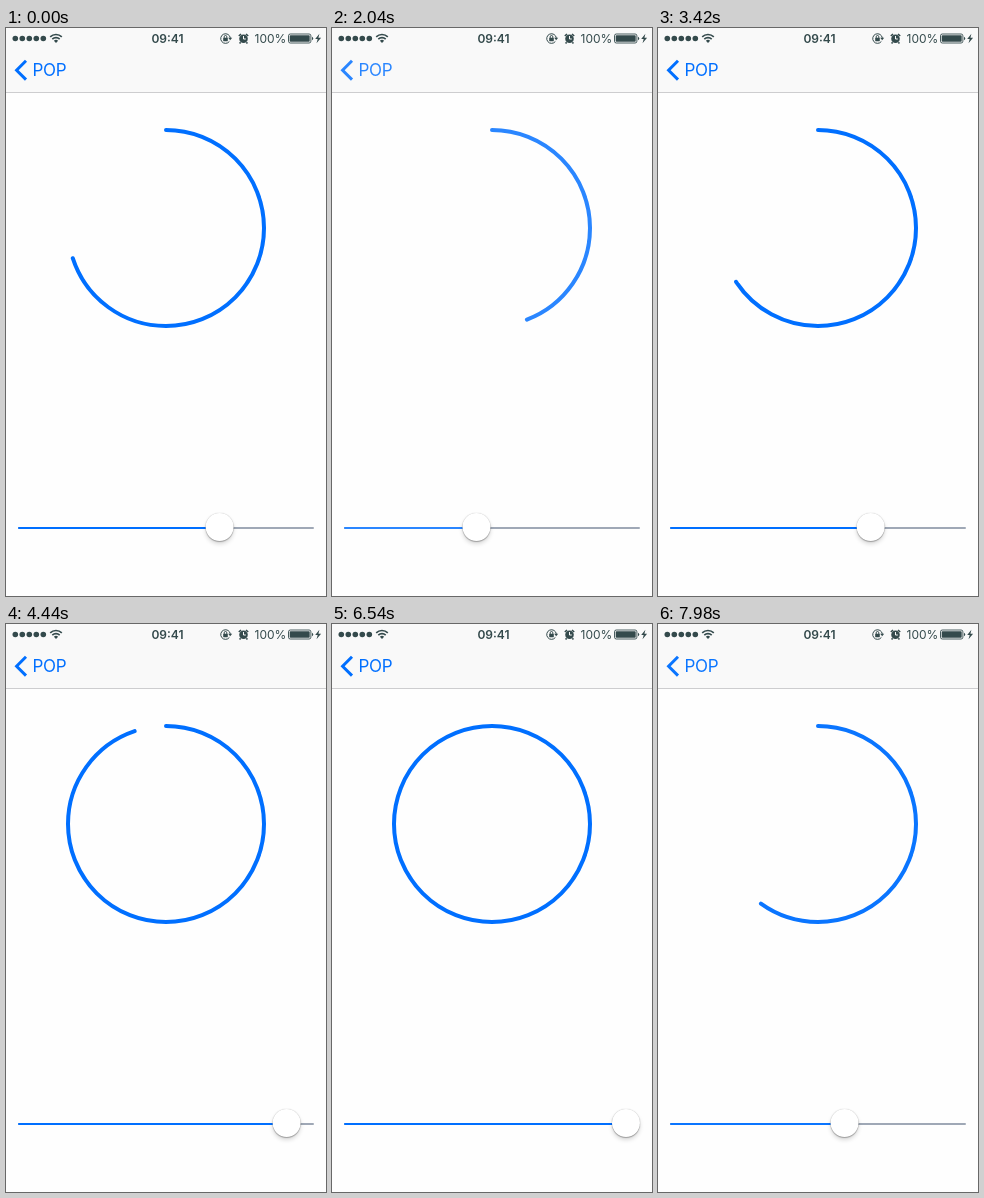
An HTML page that plays this animation: 320x568 px, repeating every 8000 ms.

```html
<!DOCTYPE html>
<html lang="en">
<head>
<meta charset="utf-8">
<title>Progress ring</title>
<style>
@property --v { syntax: "<number>"; inherits: true; initial-value: .7; }
@property --a { syntax: "<number>"; inherits: true; initial-value: .7; }

html, body { margin: 0; width: 100%; height: 100%; overflow: hidden; background: #fff; }

.stage {
  --t: clamp(0, (.65 - var(--a)) / .21, 1);
  --x: calc(26px + 268px * var(--v));
  position: relative;
  width: 320px;
  height: 568px;
  overflow: hidden;
  background: #fefefe;
  color: rgb(calc(42 * var(--t)) calc(111 + 23 * var(--t)) 255);
  animation: drag 8s infinite ease-in-out, follow 8s infinite ease-in-out;
}

svg { position: absolute; inset: 0; font-family: Inter, Roboto, sans-serif; }
.status { fill: #344a4c; font-size: 12px; }
.line { fill: none; stroke: #344a4c; }
.ring {
  fill: none;
  stroke: currentColor;
  stroke-width: 4;
  stroke-linecap: round;
  stroke-dasharray: 100px 100px;
  stroke-dashoffset: calc((1 - var(--a)) * 100px);
}

.track, .fill { position: absolute; left: 12px; top: 499px; height: 2px; border-radius: 1px; }
.track { width: 296px; background: #9fa8b6; }
.fill { width: calc(var(--x) - 12px); background: currentColor; }
.thumb {
  position: absolute;
  left: -14px;
  top: 485px;
  width: 28px;
  height: 28px;
  border-radius: 50%;
  background: #fff;
  box-shadow: 0 0 1px rgba(0, 0, 0, .28), 0 1px 1px rgba(0, 0, 0, .26), 0 3px 4px rgba(0, 0, 0, .15);
  transform: translateX(var(--x));
}

/* finger on the slider */
@keyframes drag {
  0% { --v: .7; }
  5.6% { --v: .75; animation-timing-function: ease-in; }
  12.75% { --v: .651; animation-timing-function: ease-out; }
  23%, 26.5% { --v: .442; }
  34% { --v: .65; }
  40.875% { --v: .65; animation-timing-function: ease-in; }
  42.75% { --v: .696; animation-timing-function: ease-out; }
  53%, 56% { --v: .95; }
  73%, 81.75% { --v: 1; }
  91.25%, 100% { --v: .599; }
}

/* ring trails behind the slider */
@keyframes follow {
  0%, .8% { --a: .7; }
  7.2% { --a: .75; animation-timing-function: ease-in; }
  12.75% { --a: .694; animation-timing-function: ease-out; }
  24.6%, 28% { --a: .442; }
  36% { --a: .65; }
  41.2% { --a: .65; animation-timing-function: ease-in; }
  42.75% { --a: .657; animation-timing-function: ease-out; }
  54.6%, 57% { --a: .948; }
  75.5%, 82.2% { --a: 1; }
  93.5%, 100% { --a: .599; }
}
</style>
</head>
<body>
<div class="stage">
  <svg width="320" height="568" viewBox="0 0 320 568">
    <rect width="320" height="64" fill="#f9f9f9"/>
    <rect y="64" width="320" height="1" fill="#cdcdcf"/>

    <g class="status">
      <circle cx="9.3" cy="10.5" r="2.8"/>
      <circle cx="16.3" cy="10.5" r="2.8"/>
      <circle cx="23.3" cy="10.5" r="2.8"/>
      <circle cx="30.3" cy="10.5" r="2.8"/>
      <circle cx="37.3" cy="10.5" r="2.8"/>
      <path d="M50 15 47.9 12.7A3 3 0 0 1 52.1 12.7Z"/>
      <g class="line" stroke-width="1.6">
        <path d="M44.2 8.9A8.3 8.3 0 0 1 55.8 8.9"/>
        <path d="M46.3 11.1A5.3 5.3 0 0 1 53.7 11.1"/>
      </g>
      <text x="161.5" y="14.7" font-weight="600" text-anchor="middle">09:41</text>

      <path class="line" d="M223.4 13.4A4.8 4.8 0 1 1 224.3 10"/>
      <path d="M222.2 9.7h4l-2 2.6z"/>
      <rect x="217.2" y="9.8" width="4.6" height="3.4" rx=".4"/>
      <path class="line" d="M218.2 10V8.8a1.3 1.3 0 0 1 2.6 0V10"/>

      <circle cx="237.5" cy="10.7" r="4.3"/>
      <path class="line" stroke-width="1.6" d="M232.8 8 235 6M242.2 8 240 6M234.6 14.2l-1 1.2M240.4 14.2l1 1.2"/>
      <path fill="none" stroke="#f9f9f9" d="M237.5 8v3h2.3"/>

      <text x="248.6" y="14.7">100%</text>
      <rect class="line" x="282.5" y="6" width="22.4" height="9" rx="1.8" stroke-width=".9"/>
      <rect x="283.7" y="7.2" width="20" height="6.6" rx=".8"/>
      <path d="M306 8.8a1.8 1.8 0 0 1 0 3.4z"/>
      <path d="M313.4 5.8 309.2 11h2.5l-1.2 4.2 4.6-5.4h-2.7z"/>
    </g>

    <path d="M20 32.8 10.6 42.2 20 51.6" fill="none" stroke="currentColor" stroke-width="3"/>
    <text x="26.6" y="48.2" font-size="17" letter-spacing="-.4" fill="currentColor">POP</text>

    <circle class="ring" cx="160" cy="200" r="98" pathLength="100" transform="rotate(-90 160 200)"/>
  </svg>
  <div class="track"></div>
  <div class="fill"></div>
  <div class="thumb"></div>
</div>
</body>
</html>
```
